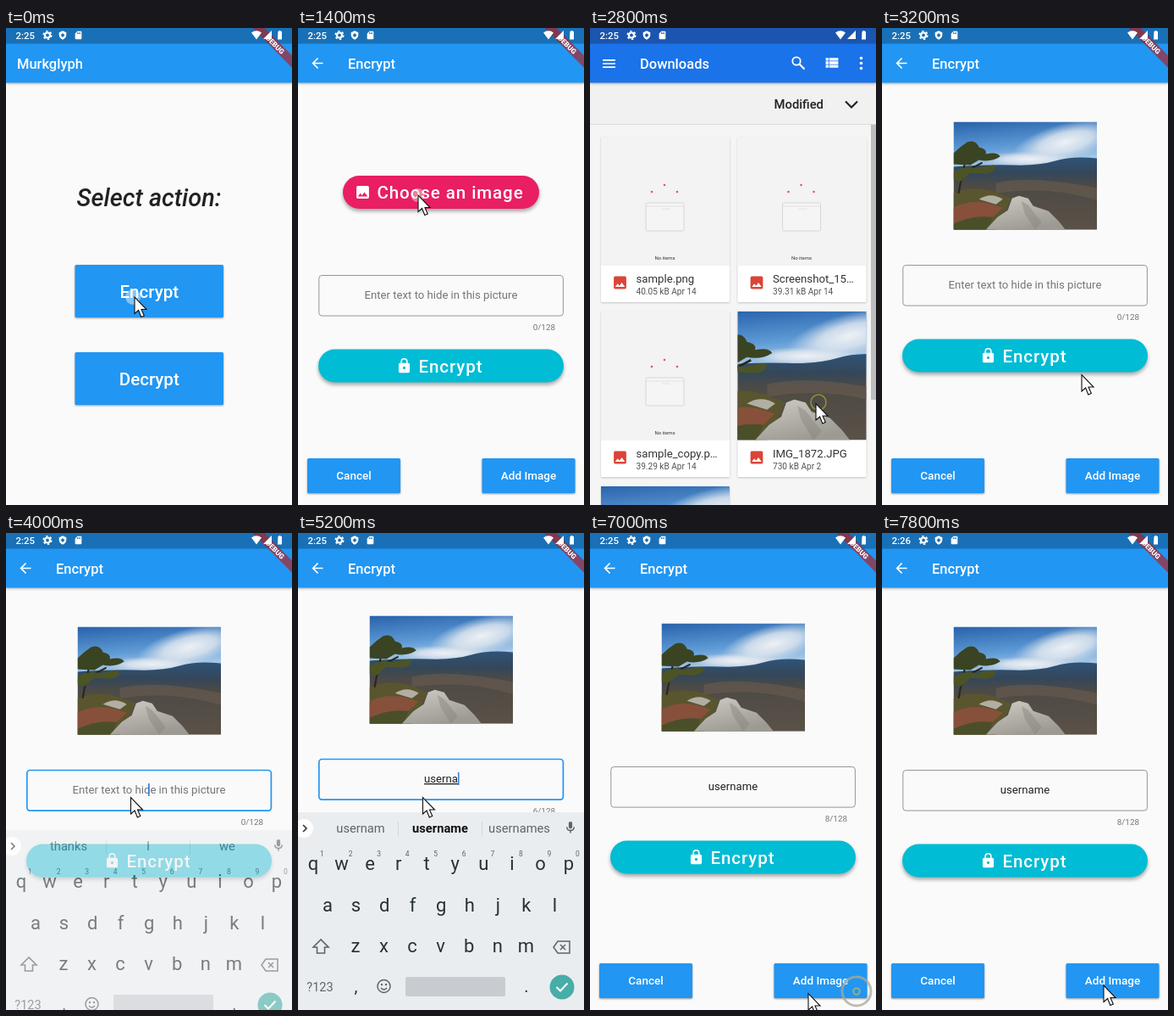
These frames come from a looping animation (338x562 px, 8 s). An HTML page:

```html
<!DOCTYPE html>
<html lang="en">
<head>
<meta charset="utf-8">
<title>Hide text in a picture</title>
<style>
html, body { margin: 0; width: 100%; height: 100%; overflow: hidden; background: #fafafa; }
svg { display: block; }
#stage { width: 100%; height: 100%; font-family: Roboto, sans-serif; }
.bar { filter: drop-shadow(0 1.5px 1.5px #0005); }
.raised { filter: drop-shadow(0 1.5px 1.2px #0006); }
.pill { filter: drop-shadow(0 3px 2px #0005); }
.card { filter: drop-shadow(0 1px 1px #0003); }
</style>
</head>
<body>
<svg id="stage" viewBox="0 0 338 562"></svg>
<script>
const BLUE = '#2196f3';
const LOOP = 8000, STEP = 200;

const rect = (x, y, w, h, fill, more = '') =>
  `<rect x="${x}" y="${y}" width="${w}" height="${h}" fill="${fill}" ${more}/>`;
const circle = (x, y, r, fill, more = '') =>
  `<circle cx="${x}" cy="${y}" r="${r}" fill="${fill}" ${more}/>`;
const path = (d, fill, more = '') => `<path d="${d}" fill="${fill}" ${more}/>`;
const line = (d, color, width = 1.6, more = '') =>
  path(d, 'none', `stroke="${color}" stroke-width="${width}" ${more}`);
const text = (x, y, size, str, fill, more = '') =>
  `<text x="${x}" y="${y}" font-size="${size}" fill="${fill}" ${more}>${str}</text>`;
const mid = 'text-anchor="middle"';
const medium = 'font-weight="500"';
const group = (id, body, more = '') => `<g id="${id}" ${more}>${body}</g>`;

// Icons on a 24 unit grid
const icons = {
  back: 'M20 11H7.8l5.6-5.6L12 4l-8 8 8 8 1.4-1.4L7.8 13H20z',
  image: 'M21 19V5a2 2 0 0 0-2-2H5a2 2 0 0 0-2 2v14a2 2 0 0 0 2 2h14a2 2 0 0 0 2-2zM8.5 13.5l2.5 3 3.5-4.5 4.5 6H5z',
  lock: 'M18 8h-1V6A5 5 0 0 0 7 6v2H6a2 2 0 0 0-2 2v10a2 2 0 0 0 2 2h12a2 2 0 0 0 2-2V10a2 2 0 0 0-2-2zm-6 9a2 2 0 1 1 0-4 2 2 0 0 1 0 4zm3.1-9H8.9V6a3.1 3.1 0 0 1 6.2 0z',
  menu: 'M3 6h18v2H3zm0 5h18v2H3zm0 5h18v2H3z',
  list: 'M3 5h4v4H3zm5 0h13v4H8zM3 10h4v4H3zm5 0h13v4H8zM3 15h4v4H3zm5 0h13v4H8z',
  shield: 'M12 1L3 5v6c0 6 4 10 9 12 5-2 9-6 9-12V5zm0 6l5 5-5 5-5-5z',
  card: 'M18 2h-8L4 8v12a2 2 0 0 0 2 2h12a2 2 0 0 0 2-2V4a2 2 0 0 0-2-2zM9 5h2v4H9zm3 0h2v4h-2zm3 0h2v4h-2z',
  mic: 'M12 14a3 3 0 0 0 3-3V5a3 3 0 0 0-6 0v6a3 3 0 0 0 3 3zm5-3a5 5 0 0 1-10 0H5a7 7 0 0 0 6 7v3h2v-3a7 7 0 0 0 6-7z',
};
const icon = (name, cx, cy, size, fill) =>
  path(icons[name], fill, `fill-rule="evenodd" transform="translate(${cx - size / 2} ${cy - size / 2}) scale(${size / 24})"`);

const photo = (x, y, w, h) => `<use href="#photo" x="${x}" y="${y}" width="${w}" height="${h}"/>`;

const defs = `<defs>
  <linearGradient id="sky" x2=".25" y2="1">
    <stop stop-color="#2762ab"/><stop offset=".55" stop-color="#5f9bd6"/><stop offset="1" stop-color="#c3d9ea"/>
  </linearGradient>
  <radialGradient id="cloud">
    <stop stop-color="#eef1f5"/><stop offset=".5" stop-color="#dde5ee" stop-opacity=".85"/><stop offset="1" stop-color="#cfdcea" stop-opacity="0"/>
  </radialGradient>
  <linearGradient id="hills" x2="0" y2="1">
    <stop stop-color="#2f5378"/><stop offset=".22" stop-color="#34475a"/><stop offset=".4" stop-color="#4d4a45"/><stop offset="1" stop-color="#5b5147"/>
  </linearGradient>
  <linearGradient id="rock" x2=".5" y2="1">
    <stop stop-color="#cfccc4"/><stop offset="1" stop-color="#9c9a92"/>
  </linearGradient>
  <symbol id="photo" viewBox="0 0 169 127" preserveAspectRatio="xMidYMid slice">
    ${rect(0, 0, 169, 60, 'url(#sky)')}
    <ellipse cx="132" cy="24" rx="64" ry="22" fill="url(#cloud)" transform="rotate(-14 132 24)"/>
    <ellipse cx="88" cy="44" rx="56" ry="9" fill="url(#cloud)"/>
    ${path('M0 53Q40 50 70 51T120 46 169 43V127H0z', 'url(#hills)')}
    ${path('M50 72Q90 62 169 78V92Q110 74 50 84z', '#6a5d50', 'opacity=".6"')}
    ${path('M0 84Q22 74 48 82L68 90 50 127H0z', '#59552f')}
    ${path('M0 101Q18 91 42 96L58 101 44 114 12 122 0 120z', '#87503a')}
    ${path('M30 91Q44 82 58 91L50 97z', '#b3aea4')}
    ${path('M0 120Q22 109 46 112L40 127H0z', '#4a4f2a')}
    ${path('M69 90L77 87 88 90 94 99 112 105 124 117 132 127H38L52 112 64 104z', 'url(#rock)')}
    ${path('M80 93L88 98 104 118 96 127 84 108z', '#85837c', 'opacity=".45"')}
    ${line('M6 84Q10 62 17 34M11 60L34 48', '#2d261b', 2.2)}
    ${path('M0 37Q8 29 16 24 26 20 30 30 40 32 38 38 52 35 55 41 44 48 30 45L20 51 0 50z', '#3a4422')}
    ${path('M0 59Q14 51 26 55L47 51Q54 57 40 61L20 60 8 70 0 68z', '#4c5425')}
  </symbol>
</defs>`;

const appBar = (title, x, color = BLUE, status = '#1970b6') =>
  `<g class="bar">${rect(0, 0, 338, 64.5, color)}</g>${rect(0, 0, 338, 18.5, status)}` +
  text(x, 48, 16.5, title, '#fff', medium);

const button = (x, y, w, h, label, size, baseline) =>
  `<g class="raised">${rect(x, y, w, h, BLUE, 'rx="1.6"')}</g>` +
  text(x + w / 2, baseline, size, label, '#fff', `${mid} ${medium}`);

const pill = (x, y, w, color, name, iconX, label, labelX) =>
  `<g class="pill">${rect(x, y, w, 39, color, 'rx="19.5"')}</g>` +
  icon(name, iconX, y + 19.5, 19.7, '#fff') +
  text(labelX, y + 27, 20.55, label, '#fff', `${medium} letter-spacing=".9"`);

const home = rect(0, 0, 338, 562, '#fafafa') + appBar('Murkglyph', 13) +
  text(169, 210, 28.9, 'Select action:', '#212121', `${mid} ${medium} font-style="italic"`) +
  button(81.5, 279, 175.5, 62, 'Encrypt', 20.55, 317.5) +
  button(81.5, 382, 175.5, 62, 'Decrypt', 20.55, 420.5);

const form =
  rect(24.8, 279.5, 288.6, 47.6, 'none', 'id="field" rx="3.5"') +
  text(169, 307, 13.15, '', '#757575', `id="entry" ${mid}`) +
  rect(0, 295, 1.6, 15, '#3b7ddd', 'id="caret"') +
  text(304, 343.5, 9.9, '', '#757575', 'id="counter" text-anchor="end"') +
  pill(24, 366.5, 290, '#00bcd4', 'lock', 125.5, 'Encrypt', 142.5);

const encrypt = rect(0, 0, 338, 562, '#fafafa') + appBar('Encrypt', 59) + icon('back', 23, 41.5, 19.7, '#fff') +
  group('choose', pill(53, 174, 232, '#e91e63', 'image', 76.5, 'Choose an image', 93.5)) +
  group('chosen', photo(84.5, 110.5, 169.5, 127.3)) +
  group('form', form) +
  group('actions', button(11, 507, 110, 41, 'Cancel', 13.5, 532) + button(217.5, 507, 110, 41, 'Add Image', 13.5, 532));

const emptyThumb = (x, y) => rect(x, y, 152, 152, '#f3f3f3') +
  rect(x + 53, y + 78, 45, 33, '#f5f5f5', 'rx="1.5" stroke="#d6d6d6"') +
  line(`M${x + 53} ${y + 82}h45M${x + 72} ${y + 85}h10`, '#dedede', 0.8) +
  [[60, 65], [75, 57], [90, 65]].map(([dx, dy]) => circle(x + dx, y + dy, 1.3, '#e0556c')).join('') +
  text(x + 75.5, y + 145, 6, 'No items', '#333', mid);

const fileCard = (x, y, name, info, isPhoto) =>
  `<g class="card">${rect(x, y, 152, 195, '#fff', 'rx="1"')}</g>` +
  (isPhoto ? photo(x, y, 152, 151.5) : emptyThumb(x, y)) +
  icon('image', x + 22.5, y + 172, 19.7, '#db4437') +
  text(x + 41.5, y + 171.5, 13.2, name, '#333') +
  text(x + 41.5, y + 186, 10.1, info, '#555');

const picker = rect(0, 0, 338, 562, '#f5f5f5') +
  fileCard(13, 128, 'sample.png', '40.05 kB Apr 14') +
  fileCard(174.5, 128, 'Screenshot_15…', '39.31 kB Apr 14') +
  fileCard(13, 334, 'sample_copy.p…', '39.29 kB Apr 14') +
  fileCard(174.5, 334, 'IMG_1872.JPG', '730 kB Apr 2', true) +
  fileCard(13, 540, '', '', true) +
  rect(332, 113, 6, 325, '#bdbdbd') +
  rect(0, 64, 338, 49, '#f1f1f1') + rect(0, 113, 338, 1, '#dcdcdc') +
  text(217.5, 95, 14.8, 'Modified', '#222', medium) + line('M302 86.500l7 7 7-7', '#222', 2.2) +
  appBar('Downloads', 59, '#1a73e8', '#1b55b0') +
  icon('menu', 22.5, 42, 19.7, '#fff') + icon('list', 286, 41, 19.7, '#fff') +
  circle(244, 39, 4.7, 'none', 'stroke="#fff" stroke-width="1.8"') + line('M247.500 42.500l6 6', '#fff', 2.2) +
  [35.5, 41.5, 47.5].map(y => circle(320.5, y, 1.8, '#fff')).join('');

// Keyboard
const INK = '#263238', SOFT = '#5f6368';
const keyRow = (keys, x0, y) => [...keys].map((k, i) =>
  text(x0 + i * 33.55, y, 22, k, INK, mid)).join('');
const keyboard = rect(0, 329, 338, 233, '#eaedf0') +
  [...'1234567890'].map((n, i) => text(28.5 + i * 33.55, 381, 8.5, n, SOFT, mid)).join('') +
  keyRow('qwertyuiop', 18, 397) + keyRow('asdfghjkl', 35, 446) + keyRow('zxcvbnm', 68, 494) +
  line('M118.500 340v18M217.500 340v18', '#d3d7da', 1) +
  [74, 168, 261.5].map((x, i) => text(x, 353, 14.7, '', SOFT, `id="hint${i}" ${mid}`)).join('') +
  circle(7, 348, 11, '#fff') + line('M6 344l4 4-4 4', '#333', 1.6) + icon('mic', 322, 347, 17, SOFT) +
  line('M27 479l-9 9h4.500v7h9v-7h4.500z', SOFT, 1.6) +
  line('M302 488l5-7h14v14h-14zM310 485l6 6M316 485l-6 6', SOFT, 1.5) +
  text(26, 540, 14.5, '?123', SOFT, mid) + text(68.5, 541, 20, ',', INK, mid) + text(270, 541, 20, '.', INK, mid) +
  circle(101.5, 534, 7.5, 'none', `stroke="${SOFT}" stroke-width="1.5"`) +
  circle(99, 532, 1.2, SOFT) + circle(104, 532, 1.2, SOFT) + line('M98 536q3.500 4 7 0', SOFT, 1.3) +
  rect(127, 523, 118, 23, '#c8ccd0', 'rx="2"') +
  circle(312, 535, 14.5, '#47ada6') + line('M305.500 535l4.500 4.500 8.500-9', '#fff', 2);

const banner = group('banner', `<g transform="translate(338 0) rotate(45)">
  ${rect(-33, 23, 66, 10, '#b71c1c', 'opacity=".65"')}
  ${text(0, 31, 8.4, 'DEBUG', '#fff', `${mid} font-weight="900"`)}</g>`);

const statusIcons = text(11.5, 13, 11.4, '', '#fff', `id="clock" ${medium}`) +
  circle(49, 8.5, 3, 'none', 'stroke="#fff" stroke-width="2.2"') +
  circle(49, 8.5, 4.8, 'none', 'stroke="#fff" stroke-width="1.5" stroke-dasharray="2.500 2.526"') +
  icon('shield', 67, 8.5, 11.5, '#fff') + icon('card', 85.5, 8.5, 11.5, '#fff') +
  path('M290 5.500q6-4.500 12 0l-6 8z', '#fff') + path('M314 3v10h-10z', '#fff') +
  path('M321.500 4h1v-1h2v1h1.500v9.500h-5z', '#fff');

const pointer = path('M0 0V19.500L4.600 15.500 7.800 23.500 11.300 22 8 14.500H14z', '#fff', 'stroke="#111" stroke-width="1.100"');

const stage = document.getElementById('stage');
stage.innerHTML = defs + group('home', home) + group('encrypt', encrypt) + group('picker', picker) +
  group('keyboard', keyboard) + banner + statusIcons + group('tap', '') + group('pointer', pointer);
const el = id => document.getElementById(id);

// Tables of [time, value...]
const tracks = {
  encrypt: [[0, 0], [200, .5], [400, 1]],
  picker: [[1400, 0], [1600, .6], [1800, 1], [2800, 1], [3000, .4], [3200, 0]],
  shift: [[2900, 12], [3000, 0], [4000, 0], [4400, -13], [6800, -13], [7000, -4], [7200, 0]],
  keys: [[3800, 0, 45], [4000, .62, 21], [4200, 1, 0], [6600, 1, 0], [6800, .62, 21], [7000, 0, 45]],
  pointer: [[400, 152, 317], [1200, 142, 197], [1800, 142, 197], [2600, 267, 442.5], [3000, 267, 442.5],
    [3600, 147.5, 311.5], [5800, 147.5, 311.5], [6600, 312, 538], [6800, 312, 538], [7000, 258, 542.5], [7200, 262, 533]],
};
const taps = {
  0: circle(150, 317, 9, '#fff', 'opacity=".45"'),
  1400: circle(141.5, 197, 8, '#fff', 'opacity=".4"') + circle(142, 197, 4, 'none', 'stroke="#b5a87a" opacity=".7"'),
  2800: circle(270, 441, 9, 'none', 'stroke="#a3a33a" stroke-width="1.500" opacity=".8"'),
  3800: circle(148, 312, 9, '#bbb', 'opacity=".4"'),
  6800: circle(314, 539, 10, 'none', 'stroke="#a8a888" stroke-width="2" opacity=".8"'),
  7000: circle(315, 540, 17, 'none', 'stroke="#a9a994" stroke-width="3" opacity=".75"') +
    circle(315, 540, 3.8, 'none', 'stroke="#b5b45c" stroke-width="2" opacity=".8"'),
};

function at(track, t) {
  const i = track.findIndex(k => k[0] > t);
  if (i === 0) return track[0].slice(1);
  if (i < 0) return track.at(-1).slice(1);
  const a = track[i - 1], b = track[i];
  const p = (t - a[0]) / (b[0] - a[0]), e = p * p * (3 - 2 * p);
  return a.slice(1).map((v, n) => v + (b[n + 1] - v) * e);
}

function place(id, x, y, opacity = 1) {
  el(id).setAttribute('transform', `translate(${x} ${y})`);
  el(id).setAttribute('opacity', opacity);
}

function suggestions(n) {
  if (!n) return ['thanks', 'I', 'we'];
  if (n < 3) return ['use', 'user', 'used'];
  return ['username'.slice(0, Math.min(n + 1, 7)), 'username', 'usernames'];
}

function draw(t) {
  const [enter] = at(tracks.encrypt, t), [pick] = at(tracks.picker, t), [shift] = at(tracks.shift, t);
  const [keysAlpha, keysDrop] = at(tracks.keys, t);
  const typed = Math.max(0, Math.min(8, Math.floor((t - 4200) / 166)));
  const focused = t >= 3800 && t < 7000;
  const hasImage = t >= 3000;

  place('encrypt', 0, 80 * (1 - enter), enter);
  place('picker', 0, 50 * (1 - pick), pick);
  place('choose', 0, 0, hasImage ? 0 : 1);
  place('chosen', 0, shift, hasImage ? 1 : 0);
  place('form', 0, shift);
  place('actions', 0, 0, keysAlpha > 0 ? 0 : 1);
  place('keyboard', 0, keysDrop, keysAlpha);
  place('banner', 0, 0, 1 - pick);
  place('pointer', ...at(tracks.pointer, t));

  el('field').setAttribute('stroke', focused ? BLUE : '#8c8c8c');
  el('field').setAttribute('stroke-width', focused ? 1.7 : 0.9);
  const entry = el('entry');
  entry.textContent = typed ? 'username'.slice(0, typed) : 'Enter text to hide in this picture';
  entry.setAttribute('fill', typed ? '#212121' : '#757575');
  entry.setAttribute('text-decoration', typed && focused ? 'underline' : 'none');
  el('caret').setAttribute('x', 168 + (typed ? entry.getComputedTextLength() / 2 + 1 : 0));
  el('caret').setAttribute('opacity', focused ? 1 : 0);
  el('counter').textContent = `${typed}/128`;

  suggestions(typed).forEach((word, i) => { el('hint' + i).textContent = word; });
  el('hint1').setAttribute('font-weight', typed ? 700 : 400);
  el('hint1').setAttribute('fill', typed ? '#111' : SOFT);

  el('clock').textContent = t < 7200 ? '2:25' : '2:26';
  el('tap').innerHTML = taps[t] || '';
}

const start = performance.now();
let shown = -1;
function tick() {
  const t = Math.floor(((performance.now() - start) % LOOP) / STEP) * STEP;
  if (t !== shown) draw(shown = t);
  requestAnimationFrame(tick);
}
tick();
</script>
</body>
</html>
```
